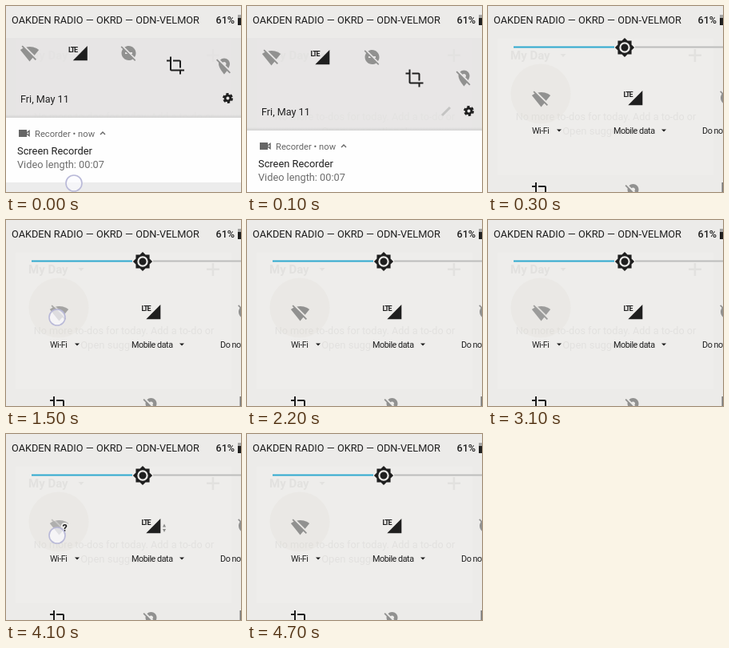
An HTML page with a canvas that plays this animation: 294 px wide and 233 px high, repeating every 4.9 s.

```html
<!DOCTYPE html>
<html lang="en">
<head>
<meta charset="utf-8">
<title>Quick settings</title>
<style>
  html, body { margin: 0; width: 100%; height: 100%; overflow: hidden; background: #ecebe9; }
  canvas { display: block; width: 294px; height: 233px; }
</style>
</head>
<body>
<canvas id="stage" width="294" height="233"></canvas>
<script>
const g = document.getElementById('stage').getContext('2d');
const LOOP = 4900, BG = '#ecebe9', INK = '#1f1f1f', GREY = '#919190';

// Icons on a 24 px grid
const ICON = {
  wifiOff: 'M23.64 7c-.45-.34-4.93-4-11.64-4-1.5 0-2.89.19-4.15.48L18.18 13.8 23.64 7zM17.04 15.22L3.27 1.44 2 2.72l2.05 2.06C1.91 5.76.59 6.82.36 7L12 21.5l3.91-4.87 3.32 3.32 1.27-1.27z',
  wifi: 'M12 21.5L23.64 7C23.2 6.66 18.7 3 12 3S.8 6.66.36 7z',
  bars: 'M23.3 3v18.2H5.3z',
  dnd: 'M17 11v2h-1.46l4.68 4.68C21.34 16.07 22 14.11 22 12c0-5.52-4.48-10-10-10-2.11 0-4.07.66-5.68 1.78L13.54 11zM2.27 2.27L1 3.54l2.78 2.78C2.66 7.93 2 9.89 2 12c0 5.52 4.48 10 10 10 2.11 0 4.07-.66 5.68-1.78L20.46 23l1.27-1.27L11 11zM7 13v-2h1.46l2 2z',
  crop: 'M17 15h2V7c0-1.1-.9-2-2-2H9v2h8zM7 17V1H5v4H1v2h4v10c0 1.1.9 2 2 2h10v4h2v-4h4v-2z',
  placeOff: 'M12 6.5c1.38 0 2.5 1.12 2.5 2.5 0 .74-.33 1.39-.83 1.85l3.63 3.63c.98-1.86 1.7-3.8 1.7-5.48 0-3.87-3.13-7-7-7-1.98 0-3.76.83-5.04 2.15l3.19 3.19c.46-.52 1.11-.84 1.85-.84zM16.37 16.1L3.27 3 2 4.27l3.18 3.18C5.07 7.95 5 8.47 5 9c0 5.25 7 13 7 13s1.67-1.85 3.38-4.35L18.73 21 20 19.73z',
  sun: 'M20 8.69V4h-4.69L12 .69 8.69 4H4v4.69L.69 12 4 15.31V20h4.69L12 23.31 15.31 20H20v-4.69L23.31 12z'
};
for (const name in ICON) ICON[name] = new Path2D(ICON[name]);

// Icon centres for each stage of the pull-down
const POSES = [
  { wifi: [29.5, 60], lte: [90.5, 59], dnd: [153.5, 59], crop: [212, 74.5], place: [273, 75.5] },
  { wifi: [30.5, 65], lte: [92, 64], dnd: [156.5, 64], crop: [209.5, 90.5], place: [271.5, 90.5] },
  { wifi: [44.5, 105.5], lte: [128.5, 105], dnd: [213.5, 105], crop: [152.5, 202], place: [235.5, 202.5] },
  { wifi: [66.5, 117], lte: [182, 115], dnd: [300, 115], crop: [66, 232], place: [181.5, 233] }
];

const ramp = (v, from, to) => Math.min(1, Math.max(0, (v - from) / (to - from)));

function rect(x, y, w, h, color) {
  g.fillStyle = color;
  g.fillRect(x, y, w, h);
}

function text(str, x, y, size, color = INK, weight = 400, align = 'left', spacing = 0) {
  g.font = `${weight} ${size}px Roboto, sans-serif`;
  g.letterSpacing = spacing + 'px';
  g.textAlign = align;
  g.fillStyle = color;
  g.fillText(str, x, y);
}

function icon(name, [x, y], color, alpha = 1, scale = 1) {
  g.save();
  g.translate(x, y);
  g.scale(scale, scale);
  g.translate(-12, -12);
  g.globalAlpha = alpha;
  g.fillStyle = color;
  g.fill(ICON[name]);
  g.restore();
}

function triangle(x, y, w, h, color) {
  g.fillStyle = color;
  g.beginPath();
  g.moveTo(x - w / 2, y);
  g.lineTo(x + w / 2, y);
  g.lineTo(x, y + h);
  g.fill();
}

function line(points, color, width) {
  g.strokeStyle = color;
  g.lineWidth = width;
  g.beginPath();
  points.forEach(([x, y]) => g.lineTo(x, y));
  g.stroke();
}

function disc(x, y, r, color) {
  g.fillStyle = color;
  g.beginPath();
  g.arc(x, y, r, 0, 7);
  g.fill();
}

function ring(x, y, r, color, width, dash = []) {
  g.strokeStyle = color;
  g.lineWidth = width;
  g.setLineDash(dash);
  g.beginPath();
  g.arc(x, y, r, 0, Math.PI * 2);
  g.stroke();
  g.setLineDash([]);
}

function touch(x, y, alpha = 1) {
  g.globalAlpha = alpha;
  disc(x, y, 10, 'rgba(250,250,255,.65)');
  ring(x, y, 10, '#b9b9d8', 1.6);
  g.globalAlpha = 1;
}

function appBehind() {
  rect(12, 41, 270, 171, '#eeedeb');
  const faint = '#e2e1df';
  text('My Day', 28, 67, 15, faint, 700);
  triangle(94, 60, 7, 4, faint);
  rect(251, 60.5, 16, 2.5, faint);
  rect(257.7, 54, 2.5, 16, faint);
  text('No more to-dos for today. Add a to-do or', 147.5, 143, 12.65, faint, 400, 'center');
  text('Open suggestions!', 147, 161, 13, faint, 400, 'center');
}

function statusBar() {
  text('OAKDEN RADIO — OKRD — ODN-VELMOR', 7, 21.5, 12.75);
  text('61%', 262.5, 21.5, 12.6, INK, 500);
  rect(290, 11, 4, 5, '#a5a5a4');
  rect(290, 15, 4, 9, INK);
}

function notification(step) {
  const dy = step * 16;
  const edge = 139 + dy;
  const shade = g.createLinearGradient(0, edge - 3, 0, edge + 2);
  shade.addColorStop(0, 'rgba(200,200,200,0)');
  shade.addColorStop(1, '#d2d2d1');
  rect(0, edge - 3, 294, 5, shade);
  rect(0, edge + 1, 294, 94, '#ececec');
  rect(0, edge + 1, 294, 81 + dy, '#fefefe');
  text('Fri, May 11', 18, 120.5 + dy, 12.6);
  ring(277.5, 115.5 + dy, 3.4, INK, 2.8);
  ring(277.5, 115.5 + dy, 5.4, INK, 2.2, [3.2, 2.45]);
  if (step) line([[244, 137], [254, 127]], '#c4c4c3', 3);
  rect(16, 155 + dy, 10, 9, '#666');
  line([[25, 159.5 + dy], [29, 156.5 + dy], [29, 162.5 + dy], [25, 159.5 + dy]], '#666', 1.5);
  text('Recorder • now', 36, 163.5 + dy, 11.2, '#666');
  line([[118, 161 + dy], [121, 158 + dy], [124, 161 + dy]], '#666', 1.4);
  text('Screen Recorder', 14, 186 + dy, 12.85);
  text('Video length: 00:07', 14, 203 + dy, 12.75, '#6d6d6d');
}

function slider(enabled) {
  g.globalAlpha = enabled ? 1 : 0.3;
  rect(32, 50.5, 126, 2, '#2fa9cf');
  rect(184, 50.5, 110, 2, '#bdbdbc');
  g.globalAlpha = 1;
  const color = enabled ? INK : '#b3b2b1';
  icon('sun', [171, 52], color, 1, 1.07);
  ring(171, 52, 5.6, BG, 2.2);
}

function labels() {
  const label = (str, x) => text(str, x, 160, 10.8, INK, 400, 'left', -0.46);
  label('Wi-Fi', 55);
  triangle(89, 154.5, 6, 3, INK);
  label('Mobile data', 157);
  triangle(220, 154.5, 6, 3, INK);
  label('Do not disturb', 268);
  rect(292.5, 221, 1.5, 12, '#777');
}

function wifi(n, at) {
  const on = n < 22 ? ramp(n, 13, 17) : ramp(n, 30, 34) * (1 - ramp(n, 42, 47));
  if (on) icon('wifi', at, '#c9c8c7', on);
  icon('wifiOff', at, GREY, 1 - on * 0.55);
  if (n >= 34 && n < 43) {
    g.font = '700 12.5px Roboto, sans-serif';
    g.textAlign = 'left';
    g.letterSpacing = '0px';
    g.strokeStyle = BG;
    g.lineWidth = 4;
    g.strokeText('?', 70.5, 122);
    text('?', 70.5, 122, 12.5, INK, 700);
  }
}

function mobileData(n, [x, y]) {
  icon('bars', [x, y], INK);
  text('LTE', x - 12.5, y - 1.5, 9, INK, 700, 'left', -1.25);
  if (n >= 32 && n < 42) {
    triangle(x + 16, y + 1.5, 4, -4, '#8a8a89');
    triangle(x + 16, y + 4, 4, 4, '#8a8a89');
  }
}

function draw(t) {
  const n = Math.floor(t / 100);
  const step = Math.min(3, n);
  const pose = POSES[step];
  rect(0, 0, 294, 233, BG);
  appBehind();
  if (step < 2) {
    rect(0, 40, 294, 193, `rgba(228,227,227,${step ? 0.6 : 0.75})`);
    notification(step);
  } else {
    slider(step === 3);
  }
  statusBar();

  if (step === 3) {
    disc(66, 110, 37.5, 'rgba(215,212,200,.18)');
    labels();
  }
  if (n >= 43 && n < 47) {
    g.globalAlpha = 0.12 * (1 - ramp(n, 43, 47));
    disc(66.5, 116, 14 + 11 * ramp(n, 42, 45), '#000');
    g.globalAlpha = 1;
  }
  wifi(n, pose.wifi);
  mobileData(n, pose.lte);
  icon('dnd', pose.dnd, GREY, 1, 0.9);
  icon('crop', pose.crop, INK);
  icon('placeOff', pose.place, GREY);

  if (n === 0) touch(85, 222);
  if (n >= 15 && n < 22) touch(64, 122, 1 - 0.75 * ramp(n, 15, 18));
  if (n >= 39 && n < 43) touch(64, 127);
}

function frame() {
  draw(performance.now() % LOOP);
  requestAnimationFrame(frame);
}
frame();
</script>
</body>
</html>
```
